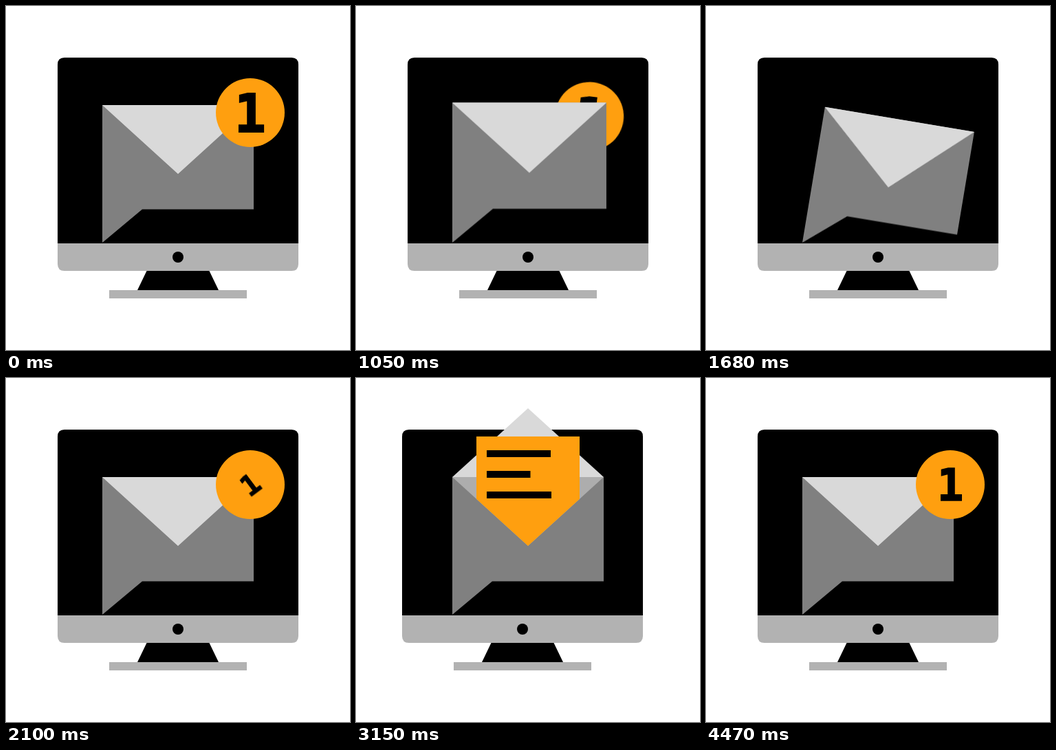
Recreate the animation shown at these times as an HTML page. Size 500 by 500 pixels, loop 4.5 s.

```html
<!DOCTYPE html>
<html lang="en">
<head>
<meta charset="utf-8">
<title>New message</title>
<style>
  html, body { margin: 0; width: 100%; height: 100%; overflow: hidden; background: #fff; }
  svg { display: block; width: 100%; height: 100%; }

  :root { --sine: cubic-bezier(.37, 0, .63, 1); }
  .monitor, .swing, .size, .flap, .letter, .line, .badge, .digit, .front, .back {
    animation: 4500ms var(--sine) infinite;
  }
  .monitor { animation-name: shake; }
  .swing { animation-name: swing; transform-origin: 140px 344px; }
  .size { animation-name: size; transform-origin: 140px 344px; }
  .flap { animation-name: flap; transform-origin: 250px 144px; }
  .letter { animation-name: letter; }
  .line { transform-origin: 190px 0; animation-timing-function: linear; }
  .l1 { animation-name: line1; }
  .l2 { animation-name: line2; }
  .l3 { animation-name: line3; }
  .badge { animation-name: badge; }
  .digit { animation-name: digit; animation-timing-function: linear; }
  .front { animation-name: front; animation-timing-function: step-end; }
  .back { animation-name: back; animation-timing-function: step-end; }

  text {
    font: bold 76px "DejaVu Sans Mono", monospace;
    text-anchor: middle;
    stroke: #000;
    stroke-width: 2;
  }

  @keyframes shake {
    0%, 58.82%, 87.76%, 100% { transform: translateX(0); }
    63.64%, 73.29%, 82.93% { transform: translateX(15px); }
    68.47%, 78.11% { transform: translateX(-15px); }
  }
  @keyframes swing {
    0%, 23.44%, 44.89%, 100% { transform: rotate(0deg); }
    27.02%, 34.16%, 41.31% { transform: rotate(-10deg); }
    30.59%, 37.73% { transform: rotate(10deg); }
  }
  @keyframes size {
    0%, 25.11%, 100% { transform: scale(1); }
    12% { transform: scale(.75); }
    17.33% { transform: scale(1.15); }
  }
  @keyframes flap {
    0%, 51.56%, 97.78%, 100% { transform: scaleY(1); }
    56%, 92.67% { transform: scaleY(-1); }
  }
  @keyframes letter {
    0%, 55.11%, 93.78%, 100% { transform: translateY(160px); }
    59.11%, 90% { transform: translateY(0); }
  }
  @keyframes line1 {
    0%, 58.67%, 87.78%, 100% { transform: scaleX(0); }
    62.22%, 84% { transform: scaleX(1); }
  }
  @keyframes line2 {
    0%, 61.33%, 88.89%, 100% { transform: scaleX(0); }
    64.44%, 85.56% { transform: scaleX(1); }
  }
  @keyframes line3 {
    0%, 64%, 90.44%, 100% { transform: scaleX(0); }
    67.56%, 87.11% { transform: scaleX(1); }
  }
  @keyframes badge {
    0%, 46.22%, 50.44%, 98.44%, 100% { transform: translate(0, 0) rotate(0deg) scale(1); }
    12% { transform: translate(-54px, 47px) rotate(0deg) scale(.75); }
    17.33% { transform: translate(85px, -95px) rotate(25deg) scale(1); }
    23.33% { transform: translate(-15px, 5px) rotate(7deg) scale(1); animation-timing-function: linear; }
    26.67% { transform: translate(-105px, 55px) rotate(0deg) scale(.6); animation-timing-function: step-start; }
    26.7%, 43.56%, 52.89%, 96.22% { transform: translate(0, 0) rotate(0deg) scale(0); }
  }
  @keyframes digit {
    0%, 26.7%, 48.22%, 52.89%, 100% { transform: rotate(0deg) scale(1); }
    26.72%, 44.89% { transform: rotate(-80deg) scale(0); }
    52.91%, 96.09% { transform: rotate(0deg) scale(0); }
  }
  @keyframes front {
    0%, 40%, 100% { visibility: visible; }
    17.33% { visibility: hidden; }
  }
  @keyframes back {
    0%, 40%, 100% { visibility: hidden; }
    17.33% { visibility: visible; }
  }
</style>
</head>
<body>
<svg viewBox="0 0 500 500">
  <defs>
    <clipPath id="pocket"><path d="M140 0H360V144L250 244L140 144Z"/></clipPath>
  </defs>

  <g class="monitor">
    <path d="M205 384H295L309 413H191Z"/>
    <rect x="150" y="413" width="200" height="12" fill="#b2b2b2"/>
    <path d="M75 345V85Q75 75 85 75H415Q425 75 425 85V345Z"/>
    <path d="M75 345H425V375Q425 385 415 385H85Q75 385 75 375Z" fill="#b2b2b2"/>
    <circle cx="250" cy="365" r="8"/>
  </g>

  <g class="back">
    <g transform="translate(355 155)">
      <g class="badge">
        <circle r="50" fill="#ff9f0f"/>
        <g class="digit"><text y="28">1</text></g>
      </g>
    </g>
  </g>

  <g class="swing">
    <g class="size">
      <path d="M140 144H360V295.5H198L140 344Z" fill="#808080"/>
      <path d="M140 144H360L250 244Z" fill="#adadad"/>
      <path class="flap" d="M140 144H360L250 244Z" fill="#d9d9d9"/>
      <g clip-path="url(#pocket)">
        <g class="letter">
          <rect x="175" y="85" width="150" height="160" fill="#ff9f0f"/>
          <rect class="line l1" x="190" y="105" width="93" height="10"/>
          <rect class="line l2" x="190" y="135" width="63.5" height="10"/>
          <rect class="line l3" x="190" y="165" width="94" height="10"/>
        </g>
      </g>
    </g>
  </g>

  <g class="front">
    <g transform="translate(355 155)">
      <g class="badge">
        <circle r="50" fill="#ff9f0f"/>
        <g class="digit"><text y="28">1</text></g>
      </g>
    </g>
  </g>
</svg>
</body>
</html>
```
